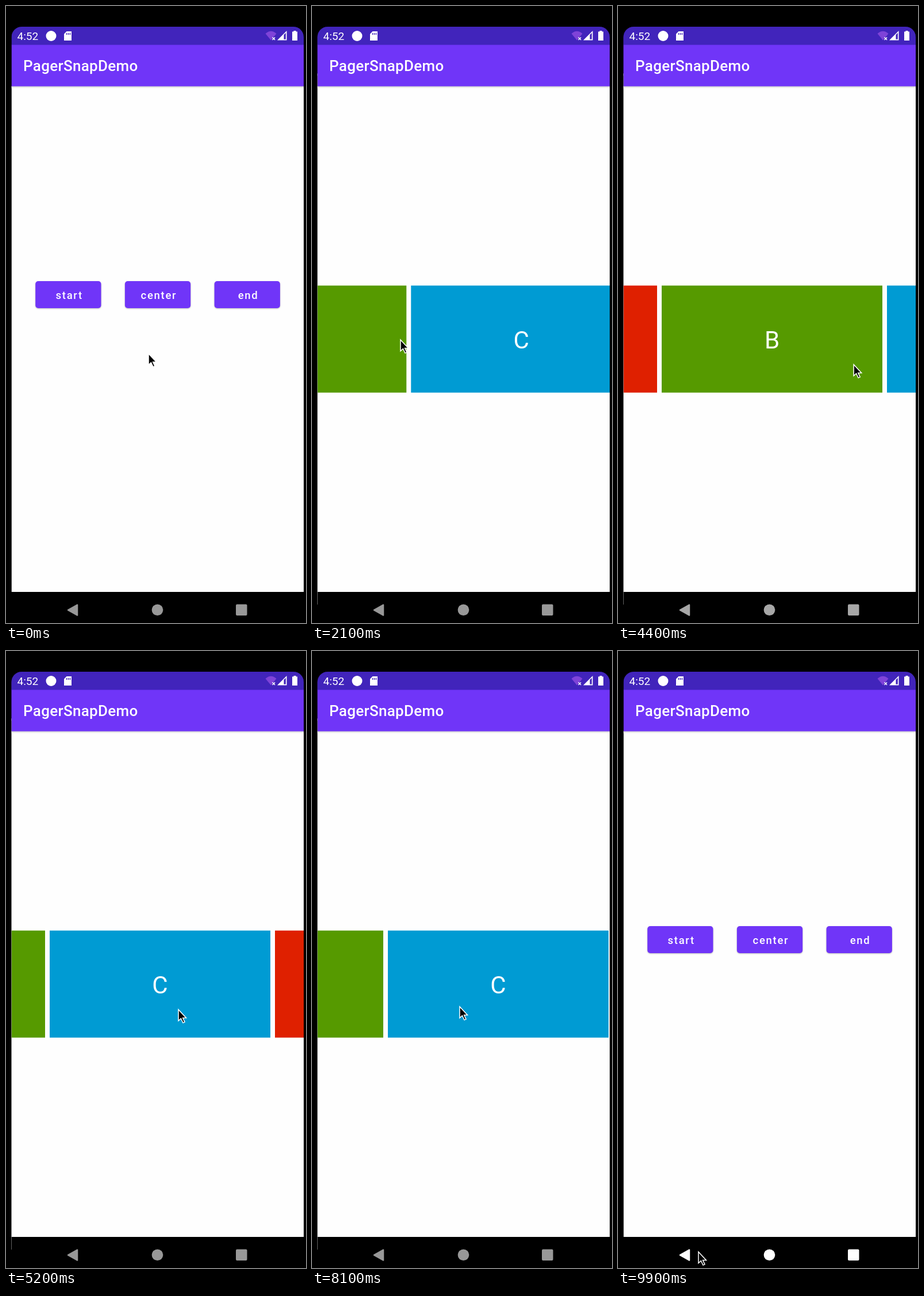
These frames come from a looping animation (522 px wide and 1072 px high, 10000 ms). An HTML page:

```html
<!DOCTYPE html>
<html lang="en">
<head>
<meta charset="utf-8">
<title>PagerSnapDemo</title>
<style>
  html, body { margin: 0; width: 100%; height: 100%; overflow: hidden; background: #000; }
  svg { display: block; width: 522px; height: 1072px; font-family: Roboto, sans-serif; }
  text { fill: #fff; }
  .title { font-size: 26px; font-weight: 500; letter-spacing: .3px; }
  .button rect { fill: #7035f8; filter: drop-shadow(0 1.5px 1px #0004); }
  .button text { font-size: 18.5px; font-weight: 500; letter-spacing: 1.7px; text-anchor: middle; }
  .button.pressed rect { fill: #9638fb; filter: drop-shadow(0 4px 4px #0003); }
  .card text { font-size: 42px; text-anchor: middle; }
</style>
</head>
<body>
<svg viewBox="0 0 522 1072">
  <defs>
    <clipPath id="display"><rect x="9.5" y="36" width="508.5" height="1100" rx="18"/></clipPath>
    <clipPath id="content"><rect x="9.5" y="139" width="508.5" height="879"/></clipPath>
    <linearGradient id="shade" x2="0" y2="1">
      <stop stop-color="#ccc"/><stop offset="1" stop-color="#fefefe"/>
    </linearGradient>
    <g id="window">
      <rect x="9.5" y="36" width="508.5" height="1086"/>
      <rect x="9.5" y="36" width="508.5" height="32" fill="#4124bb"/>
      <rect x="9.5" y="139" width="508.5" height="879" fill="#fefefe"/>
      <rect x="9.5" y="139" width="508.5" height="4" fill="url(#shade)"/>
      <rect x="9.5" y="67.5" width="508.5" height="72" fill="#7035f8"/>
      <text class="title" x="30" y="113">PagerSnapDemo</text>
    </g>
  </defs>
  <rect width="522" height="1072"/>
  <g clip-path="url(#display)">
    <g id="menu"><use href="#window"/></g>
    <g id="pager"><use href="#window"/><g clip-path="url(#content)"><g id="strip"></g></g></g>
  </g>

  <g fill="#fff">
    <text x="19.5" y="59" font-size="19">4:52</text>
    <circle cx="78.5" cy="52" r="9"/>
    <path d="M105.5 44H114V60H101V48.5z"/>
    <path d="M105.5 47v3m3-3v3m3-3v3" stroke="#4124bb" stroke-width="1.5"/>
    <path d="M451.5 48Q461 39.5 470.5 48L461 59.5z" fill="#7f43d8"/>
    <path d="M463.5 54.500l4.5 4.5m0-4.5l-4.5 4.5" stroke="#fff" stroke-width="1.6"/>
    <path d="M472 59.5L488.5 43V59.5z"/>
    <path d="M483.5 50l3.300-3.200v11h-3.300z" fill="#4124bb"/>
    <path d="M500.5 44.5V43h4V44.5H507V60H498V44.5z"/>
  </g>
  <g id="nav">
    <path d="M108 1049.5L124 1040.500v18z" stroke-width="2.5" stroke-linejoin="round"/>
    <circle cx="263.5" cy="1049.3" r="9.8" stroke="none"/>
    <rect x="400" y="1039.5" width="19.5" height="19.5" rx="2" stroke="none"/>
  </g>
  <path id="cursor" d="M0 0V19.5L4.4 15.5L8 23L11 21.600L7.6 14.4H13.5z" stroke="#fff" stroke-width="1.5"/>
</svg>
<script>
const LOOP = 10000, STEP = 100, PITCH = 392;
const OPEN_MS = 310, CLOSE_MS = 280, SWIPE_MS = 420, DRAG_MS = 200, DRAG_PX = 170;
const BACK = [116, 1044];
const $ = id => document.getElementById(id);
const clamp = v => Math.min(1, Math.max(0, v));
const progress = (t, start, length) => clamp((t - start) / length);
const easeOut = p => 1 - (1 - p) ** 3;
const smooth = p => p * p * (3 - 2 * p);

// Each visit opens a pager, swipes twice, then goes back to the menu.
// first: left edge of card A at rest; snap: left edge of a snapped card.
const visits = [
  { label: 'start', click: [125, 510], open: 500, swipes: [1150, 1860],
    first: 18, snap: 18, release: [154, 580], leave: 2100 },
  { label: 'center', click: [283, 504], open: 3400, swipes: [3900, 4600],
    first: 80, snap: 76, release: [300, 623], leave: 5200 },
  { label: 'end', click: [440, 515], open: 7000, swipes: [7310, 7680],
    first: 134, snap: 132, release: [257, 618], leave: 8500 }
];

visits.forEach((visit, i) => {
  visit.press = visit.open - 200;
  visit.close = visit.leave + 400;
  const x = 51.2 + i * 155.7;
  $('menu').insertAdjacentHTML('beforeend',
    `<g class="button"><rect x="${x}" y="478" width="114.3" height="47" rx="5"/>
     <text x="${x + 59}" y="509">${visit.label}</text></g>`);
  visit.button = $('menu').lastElementChild;
});

const colors = ['#df2000', '#569a00', '#009bd3'];
for (let i = 0; i < 4; i++) {
  $('strip').insertAdjacentHTML('beforeend',
    `<g class="card" transform="translate(${i * PITCH})">
     <rect y="485.7" width="384" height="186" fill="${colors[i % 3]}"/>
     <text x="192" y="595">${'ABC'[i % 3]}</text></g>`);
}

const cursorPath = [
  [0, 248, 604],
  ...visits.flatMap(({ press, click, open, swipes, release: [x, y], leave, close }) => [
    [press, ...click], [open + 200, ...click],
    ...swipes.flatMap(s => [[s, x + DRAG_PX, y], [s + DRAG_MS, x, y]]),
    [leave, x, y], [close, ...BACK], [close + 400, ...BACK]
  ]),
  [LOOP - STEP, 140, 1044]
];

function cursorAt(t) {
  const next = cursorPath.findIndex(key => key[0] > t);
  if (next < 0) return cursorPath.at(-1).slice(1);
  const [from, to] = [cursorPath[next - 1], cursorPath[next]];
  const p = smooth(progress(t, from[0], to[0] - from[0]));
  return [1, 2].map(axis => from[axis] + (to[axis] - from[axis]) * p);
}

function scrollAt(visit, t) {
  const [a, b] = visit.swipes.map(s => smooth(progress(t, s, SWIPE_MS)));
  return visit.first + (visit.snap - visit.first) * a - PITCH * (a + b);
}

function setWindow(id, scale, opacity) {
  $(id).setAttribute('transform', `translate(264 579) scale(${scale}) translate(-264 -579)`);
  $(id).setAttribute('opacity', opacity);
}

function draw(t) {
  let menuScale = 1, pagerScale = 1, pagerAlpha = 0, navLight = 0;
  for (const visit of visits) {
    const { press, open, close } = visit;
    visit.button.classList.toggle('pressed', t >= press && t < open + OPEN_MS);
    // Navigation keys light up on "back" and dim some time after the next page opens.
    navLight = t >= close ? 1 : navLight * (1 - progress(t, open + 400, 700));
    if (t < open || t >= close + CLOSE_MS) continue;
    const opening = progress(t, open, OPEN_MS), closing = progress(t, close, CLOSE_MS);
    const shown = easeOut(opening) - easeOut(closing);
    menuScale = 1 + .05 * shown;
    pagerScale = .85 + .15 * shown;
    pagerAlpha = Math.min(clamp(opening * 3), clamp(1 - closing * 2));
    $('strip').setAttribute('transform', `translate(${scrollAt(visit, t)})`);
  }
  setWindow('menu', menuScale, 1);
  setWindow('pager', pagerScale, pagerAlpha);

  const grey = Math.round(152 + 103 * navLight);
  for (const paint of ['fill', 'stroke']) {
    $('nav').setAttribute(paint, `rgb(${grey},${grey},${grey})`);
  }
  $('cursor').setAttribute('transform', `translate(${cursorAt(t)})`);
}

function tick() {
  draw(Math.floor(performance.now() % LOOP / STEP) * STEP);
  requestAnimationFrame(tick);
}
tick();
</script>
</body>
</html>
```
